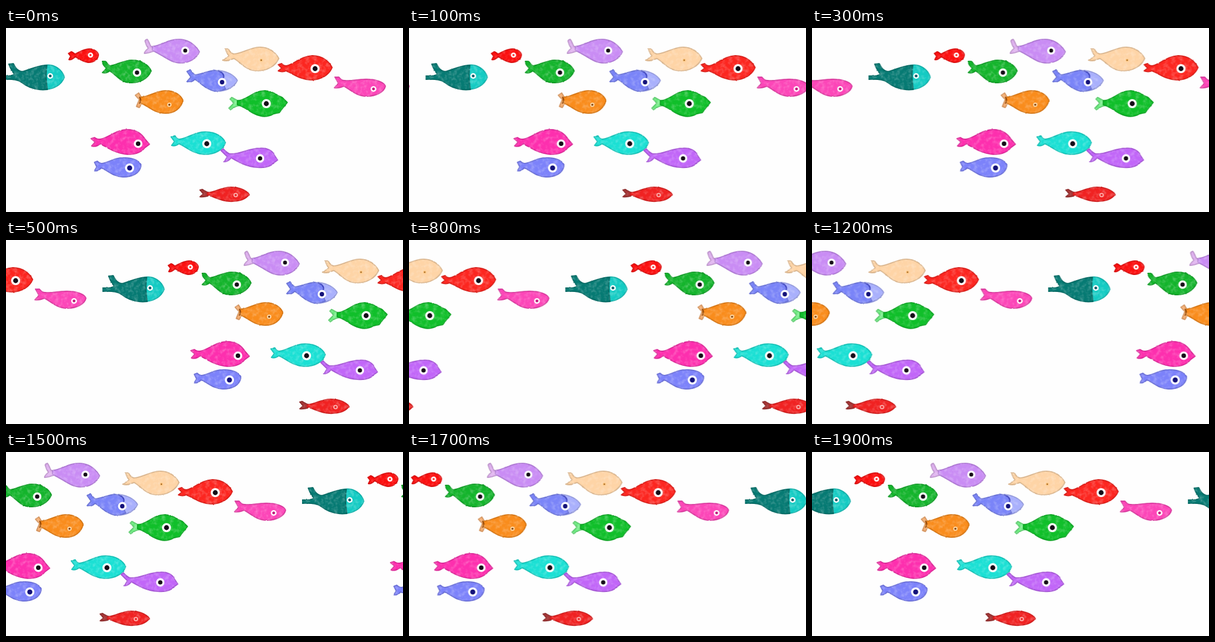
Recreate the animation shown at these times as an HTML page. Size 700 px wide and 326 px high, loop 2 s.

```html
<!DOCTYPE html>
<html lang="en">
<head>
<meta charset="utf-8">
<title>School of fish</title>
<style>
  html, body { margin: 0; width: 100%; height: 100%; overflow: hidden; background: #fefefe; }
  #sea { position: relative; width: 700px; height: 326px; overflow: hidden; }
  #sea svg {
    position: absolute; left: -704px; top: 0;
    will-change: transform;
    animation: swim 2s steps(20, end) infinite;
  }
  @keyframes swim { to { transform: translateX(704px); } }
  .paint { filter: url(#watercolour); stroke-width: 2; stroke-linejoin: round; }
  .paint path { fill: currentColor; stroke: color-mix(in srgb, currentColor 86%, black); }
  .paint .fold { fill: none; }
  .eye { fill: #160d18; stroke: #fff; stroke-width: 3.6; }
  .eye .navy { fill: #14127a; }
  .eye .small { stroke-width: 2.6; }
</style>
</head>
<body>
<div id="sea">
<svg width="1408" height="326" viewBox="-704 0 1408 326">
  <defs>
    <filter id="watercolour" filterUnits="userSpaceOnUse" x="-6" y="0" width="704" height="326" color-interpolation-filters="sRGB">
      <feTurbulence type="fractalNoise" baseFrequency=".2" numOctaves="2" seed="4" result="grain"/>
      <feDisplacementMap in="SourceGraphic" in2="grain" scale="2" xChannelSelector="R" yChannelSelector="G" result="ragged"/>
      <feTurbulence type="fractalNoise" baseFrequency=".14" numOctaves="3" seed="9"/>
      <feColorMatrix values="0 0 0 0 1  0 0 0 0 1  0 0 0 0 1  .6 0 0 0 -.26" result="wash"/>
      <feComposite in="wash" in2="ragged" operator="atop"/>
    </filter>
  </defs>

  <g id="school">
    <g class="paint">
      <!-- teal -->
      <path color="#14cbc3" d="M68 66C86 63 99 74 103 87C98 101 84 109 67 109Z"/>
      <path color="#067a73" d="M5 64L13 63C17 71 21 77 29 77C42 74 54 66 72 66Q69 87 73 109C54 111 38 105 27 96C20 91 10 90-6 91V85C4 85 10 85 15 82C10 76 7 70 5 64Z"/>
      <!-- small red -->
      <path color="#fb0f0f" d="M122 46C129 43 137 37 147 37C156 37 163 43 163 48C162 56 155 61 146 61C136 61 129 54 122 51C119 54 115 57 111 56L114 50L110 45L115 42C119 43 120 46 122 46Z"/>
      <!-- green -->
      <path color="#14b42c" d="M184 67C196 65 208 57 222 57C240 57 252 66 256 76C250 90 236 98 218 97C202 96 195 84 183 76C179 79 175 81 170 79C173 76 175 74 177 71C173 68 170 64 170 59L176 59C179 64 181 66 184 67Z"/>
      <!-- lilac -->
      <path color="#deb0ee" d="M264 32L256 33C253 30 253 24 249 20L245 22C246 28 248 32 251 36C247 39 244 42 244 45C251 45 256 42 264 40Z"/>
      <path color="#c98cf4" d="M258 33C276 30 288 19 307 20C324 21 335 32 341 42C336 54 324 62 308 62C289 62 276 47 258 40Z"/>
      <!-- peach -->
      <path color="#fed4a6" d="M403 46C419 44 430 35 446 34C464 33 476 44 481 54C475 68 460 76 442 76C423 75 415 62 402 54C395 56 389 60 383 57C387 54 391 52 393 49C389 45 388 41 387 37L392 37C395 43 399 46 403 46Z"/>
      <!-- red -->
      <path color="#fc2620" d="M494 67C508 65 519 50 540 49C559 49 570 60 575 70C570 83 556 92 537 92C517 91 507 81 494 76C489 78 485 78 480 76L486 71L480 65L486 63C490 67 491 67 494 67Z"/>
      <!-- rose -->
      <path color="#fc46b8" d="M597 93C612 95 624 89 642 91C656 92 667 97 669 103C667 113 653 121 636 121C618 121 607 109 596 103C591 105 586 107 579 106L586 98L580 87L587 87C591 92 593 93 597 93Z"/>
      <!-- blue -->
      <path color="#a9b0fc" d="M374 75C391 77 403 84 408 93C402 105 389 112 372 112Z"/>
      <path color="#7a84f8" d="M334 83C347 81 356 76 368 75Q380 76 384 85Q380 95 387 108Q379 112 368 112C353 109 344 98 333 91C329 95 325 97 319 95L326 87L319 77L325 74C329 80 331 82 334 83Z"/>
      <path class="fold" color="#4850e0" d="M374 76Q385 79 384 88"/>
      <!-- orange -->
      <path color="#f6b074" d="M240 125L234 115L228 119L235 127L230 139L235 141L240 133Z"/>
      <path color="#f98c1c" d="M236 123C252 122 263 112 281 111C298 111 308 119 312 128C309 142 297 152 279 151C260 150 252 139 236 132Z"/>
      <path class="fold" color="#a85008" d="M235 122Q240 128 235 134"/>
      <!-- leaf green -->
      <path color="#6cec80" d="M414 129C406 129 403 125 398 123L395 126L402 133L393 142L396 145C403 139 408 138 414 137Z"/>
      <path color="#10bf2a" d="M408 129C426 127 435 112 456 111C466 112 472 114 478 119L487 123L496 132L488 142L482 150L472 152C460 160 446 156 436 151C426 146 420 139 408 136Z"/>
      <!-- magenta -->
      <path color="#fd2fae" d="M166 197C182 194 194 180 214 180C230 180 240 188 246 198L253 206L245 212C239 220 230 224 215 224C192 222 181 213 166 205C162 209 157 211 151 209L157 202L150 196L156 194C160 197 162 197 166 197Z"/>
      <!-- aqua -->
      <path color="#1be0d4" d="M306 197C322 195 332 184 352 184C371 184 383 194 387 203C383 216 369 224 350 224C329 223 319 211 305 205C301 208 297 210 292 208L297 201L291 193L298 191C301 196 303 197 306 197Z"/>
      <!-- violet -->
      <path color="#c166f8" d="M396 223C413 224 427 213 448 213C460 212 470 217 473 225L479 234L472 239C466 246 456 248 444 247C424 246 409 237 397 230C394 234 391 237 385 237L390 228L379 217L383 214C388 219 391 223 396 223Z"/>
      <!-- periwinkle -->
      <path color="#7c82fa" d="M169 240C182 238 190 230 206 230C225 229 237 236 238 244C236 257 224 264 206 264C188 263 181 253 168 248C164 252 161 254 156 253L160 246L156 238L161 236C165 240 167 240 169 240Z"/>
      <!-- crimson -->
      <path color="#a83838" d="M360 292C353 291 350 288 346 286L342 287L348 294L342 299Q350 300 360 296Z"/>
      <path color="#f02222" d="M355 292C372 290 380 282 396 282C413 282 424 288 429 295C423 303 411 308 393 307C377 306 368 299 355 296Z"/>
    </g>

    <g class="eye">
      <circle class="small" cx="78" cy="85" r="3.8" style="fill:#0b5c66"/>
      <circle class="small" cx="149" cy="48" r="3.2" style="fill:#f33"/>
      <circle cx="231" cy="79" r="5.6"/>
      <circle cx="316" cy="40" r="5.3"/>
      <circle cx="545" cy="72" r="6.2"/>
      <circle class="small" cx="648" cy="108" r="3.8" style="fill:#c2187e"/>
      <circle class="navy" cx="381" cy="96" r="5.7"/>
      <circle cx="459" cy="134" r="6.2"/>
      <circle cx="233" cy="205" r="5.8"/>
      <circle cx="354" cy="205" r="6.2"/>
      <circle cx="448" cy="231" r="5.6"/>
      <circle class="navy" cx="218" cy="248" r="6.3"/>
      <circle cx="288" cy="136" r="2.8" style="fill:#7a3c08;stroke:#ffd9a8;stroke-width:2"/>
      <circle cx="405" cy="296" r="3" style="fill:#e33;stroke:#ffc4c0;stroke-width:1.6"/>
      <circle cx="450" cy="57" r="1.8" style="fill:#7a4a1c;stroke:#ffc070;stroke-width:1.4"/>
    </g>
  </g>
  <use href="#school" x="-704"/>
</svg>
</div>
</body>
</html>
```
